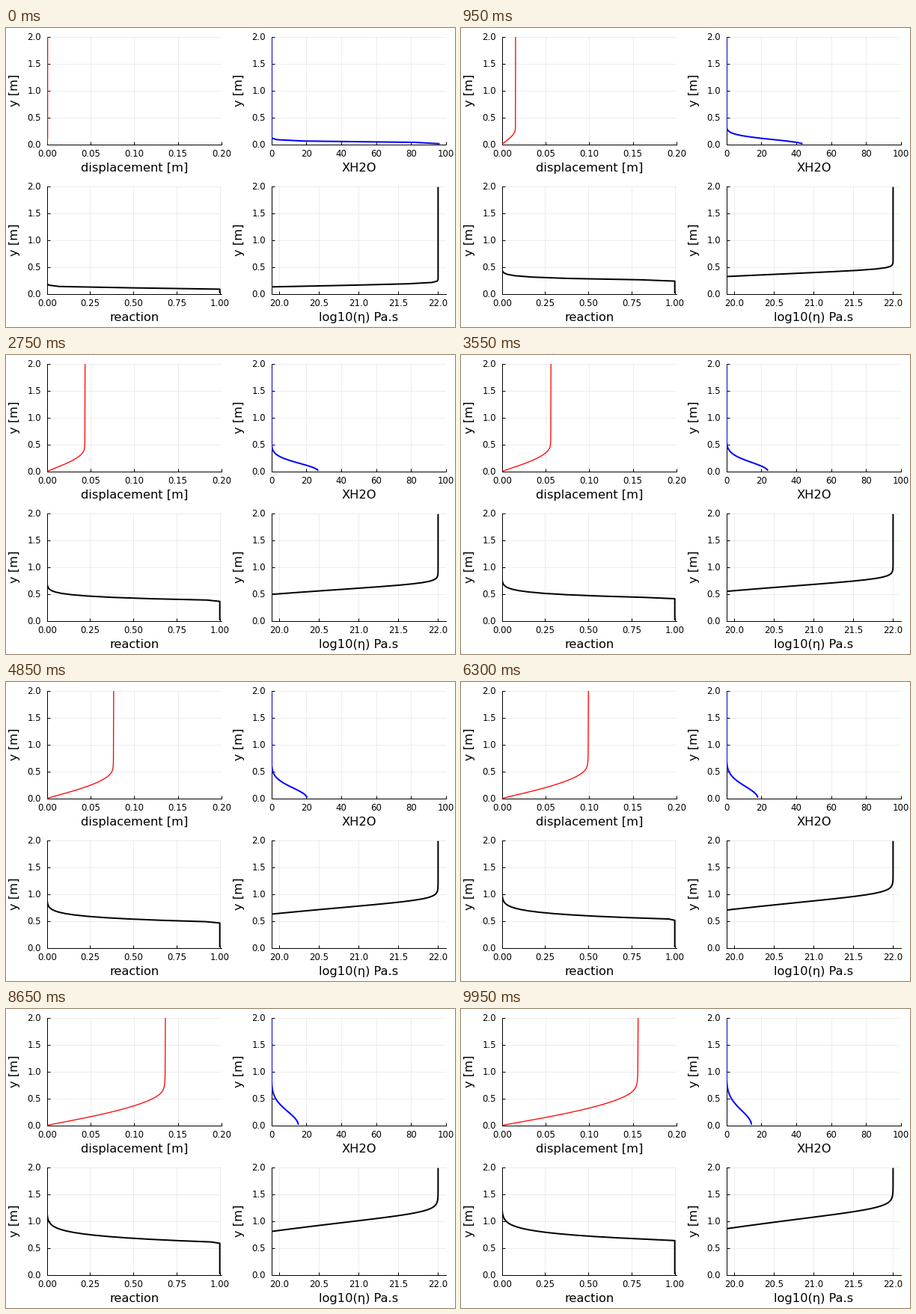
A matplotlib script for the animation above (10 s loop, 600 by 400 pixels).

```python
import numpy as np
import matplotlib
import matplotlib.pyplot as plt
from matplotlib.animation import FuncAnimation

W, H, DPI = 600, 400, 100
FRAMES, INTERVAL = 200, 50
PT = 72 / DPI                      # points per pixel
PANEL_W, PANEL_H = 233.3, 143.9

matplotlib.rcParams["font.family"] = "DejaVu Sans"

# Column model: fluid diffuses upward, weakens the rock, the top is sheared
CELLS, DEPTH, SUBSTEPS = 80, 2.0, 2
DIFFUSION = 0.153                  # D*dt/dy^2 for one substep
SLIP = 0.00078                     # top displacement per frame
dy = DEPTH / CELLS
y_mid = (np.arange(CELLS) + 0.5) * dy
y_edge = np.linspace(0, DEPTH, CELLS + 1)


def diffusion_step():
    """Implicit diffusion operator with closed ends."""
    a = np.eye(CELLS) * (1 + 2 * DIFFUSION)
    a[0, 0] = a[-1, -1] = 1 + DIFFUSION
    a -= DIFFUSION * (np.eye(CELLS, k=1) + np.eye(CELLS, k=-1))
    return np.linalg.inv(a)


def simulate():
    step = diffusion_step()
    water = np.where(y_mid < 0.05, 100.0, 0.0)
    shift = np.zeros(CELLS + 1)
    states = []
    for _ in range(FRAMES):
        for _ in range(SUBSTEPS):
            water = step @ water
            reaction = np.minimum(1, water)
            softness = 1 + 999 * reaction
            profile = np.concatenate([[0], np.cumsum(softness)])
            shift = shift + SLIP / SUBSTEPS * profile / profile[-1]
        states.append((shift, water, reaction, 22 - np.log10(softness)))
    return states


def label(x, y, text, size, **kw):
    fig.text(x / W, 1 - y / H, text, fontsize=size * PT,
             va="baseline", **kw)


def panel(left, top, xlim, ticks, fmt, title, color, width):
    bottom = top + PANEL_H
    ax = fig.add_axes([left / W, 1 - bottom / H, PANEL_W / W, PANEL_H / H])
    ax.set(xlim=xlim, ylim=(0, DEPTH), xticks=ticks,
           yticks=np.arange(0, 2.1, 0.5))
    ax.set_axisbelow(True)
    ax.grid(color="black", alpha=0.09, linewidth=0.8 * PT)
    ax.tick_params(direction="in", length=4 * PT, width=PT,
                   labelbottom=False, labelleft=False)
    for side, spine in ax.spines.items():
        spine.set_visible(side in ("left", "bottom"))
        spine.set_linewidth(PT)
        spine.set_zorder(1)

    for t in ticks:
        x = left + (t - xlim[0]) / (xlim[1] - xlim[0]) * PANEL_W
        label(x, bottom + 16.3, fmt.format(t), 11.7, ha="center")
    for t in np.arange(0, 2.1, 0.5):
        y = bottom - t / DEPTH * PANEL_H
        label(left - 7.6, y + 4.3, f"{t:.1f}", 11.7, ha="right")
    label(left + PANEL_W / 2, bottom + 36.6, title, 16.2, ha="center")
    label(left - 38.5, top + PANEL_H / 2, "y [m]", 16.2, ha="center",
          rotation=90, rotation_mode="anchor")
    line, = ax.plot([], [], color=color, linewidth=width * PT,
                    solid_capstyle="butt", solid_joinstyle="round")
    return line


fig = plt.figure(figsize=(W / DPI, H / DPI), dpi=DPI, facecolor="white")
lines = [
    panel(54.7, 11.8, (0, 0.2), np.arange(5) * 0.05, "{:.2f}",
          "displacement [m]", "red", 1.3),
    panel(354.7, 11.8, (0, 100), np.arange(6) * 20, "{:.0f}",
          "XH2O", "blue", 2),
    panel(54.7, 211.8, (0, 1.01), np.arange(5) * 0.25, "{:.2f}",
          "reaction", "black", 2),
    panel(354.7, 211.8, (19.9, 22.1), 20 + np.arange(5) * 0.5, "{:.1f}",
          "log10(η) Pa.s", "black", 2),
]
heights = [y_edge, y_mid, y_mid, y_mid]
states = simulate()


def draw(i):
    for line, x, y in zip(lines, states[i], heights):
        line.set_data(x, y)
    return lines


anim = FuncAnimation(fig, draw, frames=FRAMES, interval=INTERVAL,
                     init_func=lambda: draw(0), repeat=True, repeat_delay=0)
plt.show()
```
